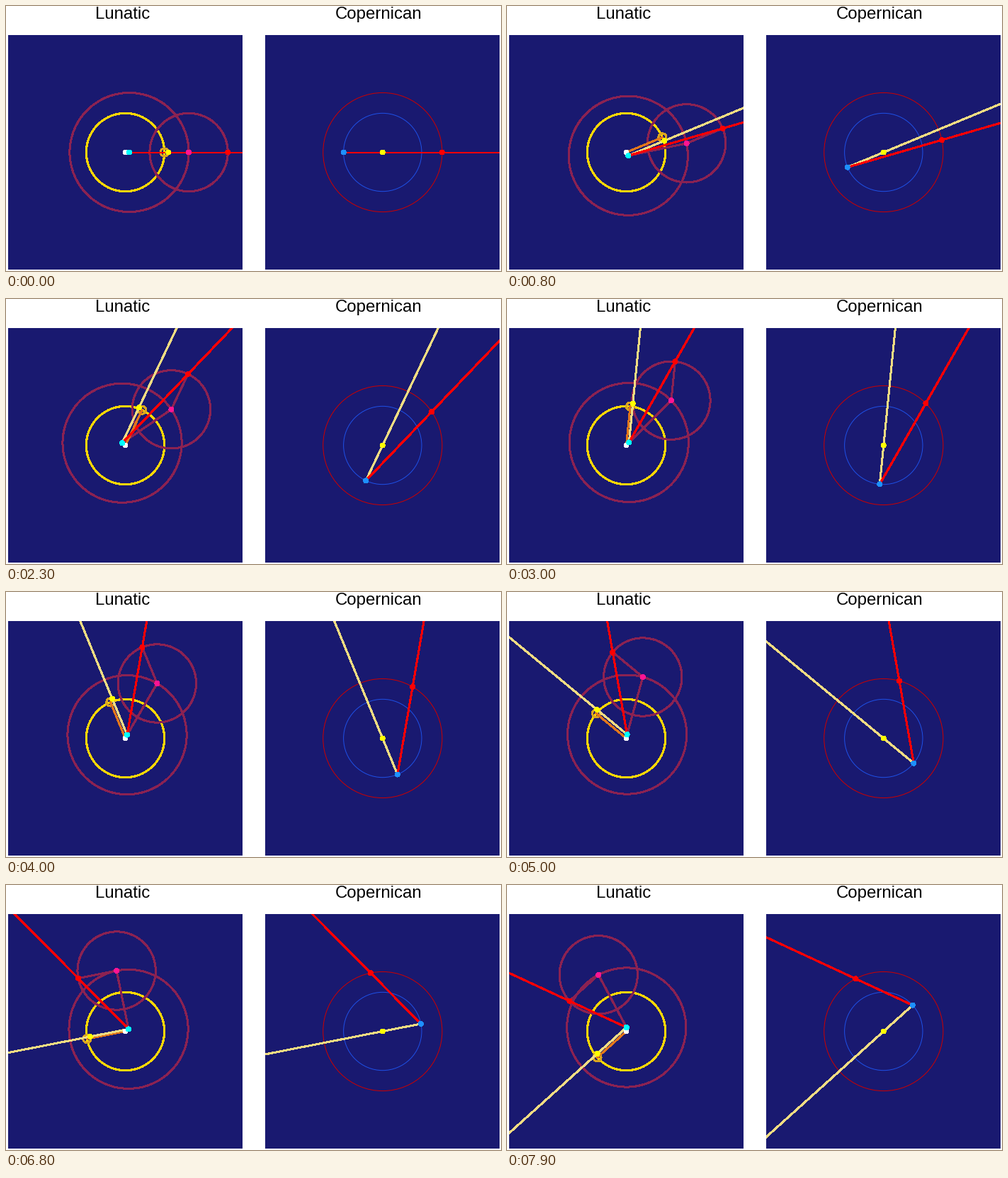
These frames come from a looping animation (699 px wide and 374 px high, 8000 ms). A matplotlib script:

```python
import numpy as np
import matplotlib.pyplot as plt
from matplotlib.animation import FuncAnimation
from matplotlib.patches import Circle, Rectangle

W, H, DPI = 699, 374, 64
PX = 72 / DPI                      # points per pixel
FRAMES, INTERVAL = 80, 100

AU = 331 / 6                       # each panel spans six astronomical units
MARS = 1.524 * AU
MOON = 0.1 * AU                    # exaggerated lunar distance

SUN_STEP = np.radians(2.81)
MARS_STEP = SUN_STEP / 1.8808
MOON_STEP = SUN_STEP * 365.25 / 27.32

NIGHT, KHAKI, WINE = "#191970", "#F0DC82", "#8B2252"
BOLD = 2 * PX                      # aliased strokes cover about one pixel more

fig = plt.figure(figsize=(W / DPI, H / DPI), dpi=DPI, facecolor="white")
ax = fig.add_axes([0, 0, 1, 1])
ax.set_xlim(0, W)
ax.set_ylim(H, 0)
ax.axis("off")


def panel(x0, title, tx):
    box = Rectangle((x0, 41), 331, 331, fc=NIGHT, lw=0, zorder=0)
    ax.add_patch(box)
    ax.text(tx, 18, title, family="Liberation Sans", size=24 * PX,
            ha="center", va="baseline", color="black")
    return box


def ring(r, color, z=1, center=(0, 0), thin=False):
    return ax.add_patch(Circle(center, r, fill=False, ec=color,
                               lw=PX if thin else BOLD,
                               antialiased=thin, zorder=z))


def dot(color, z, center=(0, 0)):
    return ax.add_patch(Circle(center, 3.5, fc=color, lw=0,
                               antialiased=False, zorder=z))


def line(color, z, box):
    art, = ax.plot([], [], color=color, lw=BOLD, antialiased=False,
                   solid_capstyle="round", zorder=z)
    art.set_clip_path(box)
    return art


def polar(r, angle):
    return np.array([r * np.cos(angle), -r * np.sin(angle)])


def join(art, *points):
    art.set_data(*np.array(points).T)


def sight(art, eye, target):
    d = target - eye
    join(art, eye, eye + d * 600 / np.hypot(*d))


left = panel(3, "Lunatic", 165)
right = panel(366, "Copernican", 525.8)
luna = np.array([168.5, 206.5])
helios = np.array([531.8, 206.5])

# Moon-centred system
ring(AU, "#FFD700", 1, luna)
deferent = ring(MARS, WINE, 2)
epicycle = ring(AU, WINE, 2)
sun_epi = ring(MOON, "#DAA520", 3)
mars_arm = line(WINE, 2, left)
sun_arm = line("#E2761B", 3, left)
l_sun_ray = line(KHAKI, 4, left)
l_mars_ray = line("red", 5, left)
dot("white", 6, luna)
l_earth = dot("cyan", 7)
l_sun = dot("yellow", 7)
pivot = dot("#FF1493", 7)
l_mars = dot("red", 7)

# Sun-centred system
ring(AU, "#1E50E6", 1, helios, thin=True)
ring(MARS, "#CD0000", 1, helios, thin=True)
r_sun_ray = line(KHAKI, 4, right)
r_mars_ray = line("red", 5, right)
dot("yellow", 6, helios)
r_earth = dot("#1E90FF", 7)
r_mars = dot("red", 7)


def update(i):
    to_sun = polar(AU, i * SUN_STEP)
    to_mars = polar(MARS, i * MARS_STEP)

    earth = luna + polar(MOON, i * MOON_STEP)
    hub = luna + to_sun
    sun = earth + to_sun
    mid = earth + to_mars
    mars = mid + to_sun
    deferent.set_center(earth)
    epicycle.set_center(mid)
    sun_epi.set_center(hub)
    for art, pos in ((l_earth, earth), (l_sun, sun), (pivot, mid), (l_mars, mars)):
        art.set_center(pos)
    join(mars_arm, earth, mid, mars)
    join(sun_arm, luna, hub, sun)
    sight(l_sun_ray, earth, sun)
    sight(l_mars_ray, earth, mars)

    earth, mars = helios - to_sun, helios + to_mars
    r_earth.set_center(earth)
    r_mars.set_center(mars)
    sight(r_sun_ray, earth, helios)
    sight(r_mars_ray, earth, mars)
    return []


anim = FuncAnimation(fig, update, frames=FRAMES, interval=INTERVAL,
                     repeat=True, repeat_delay=0, blit=False)
plt.show()
```
